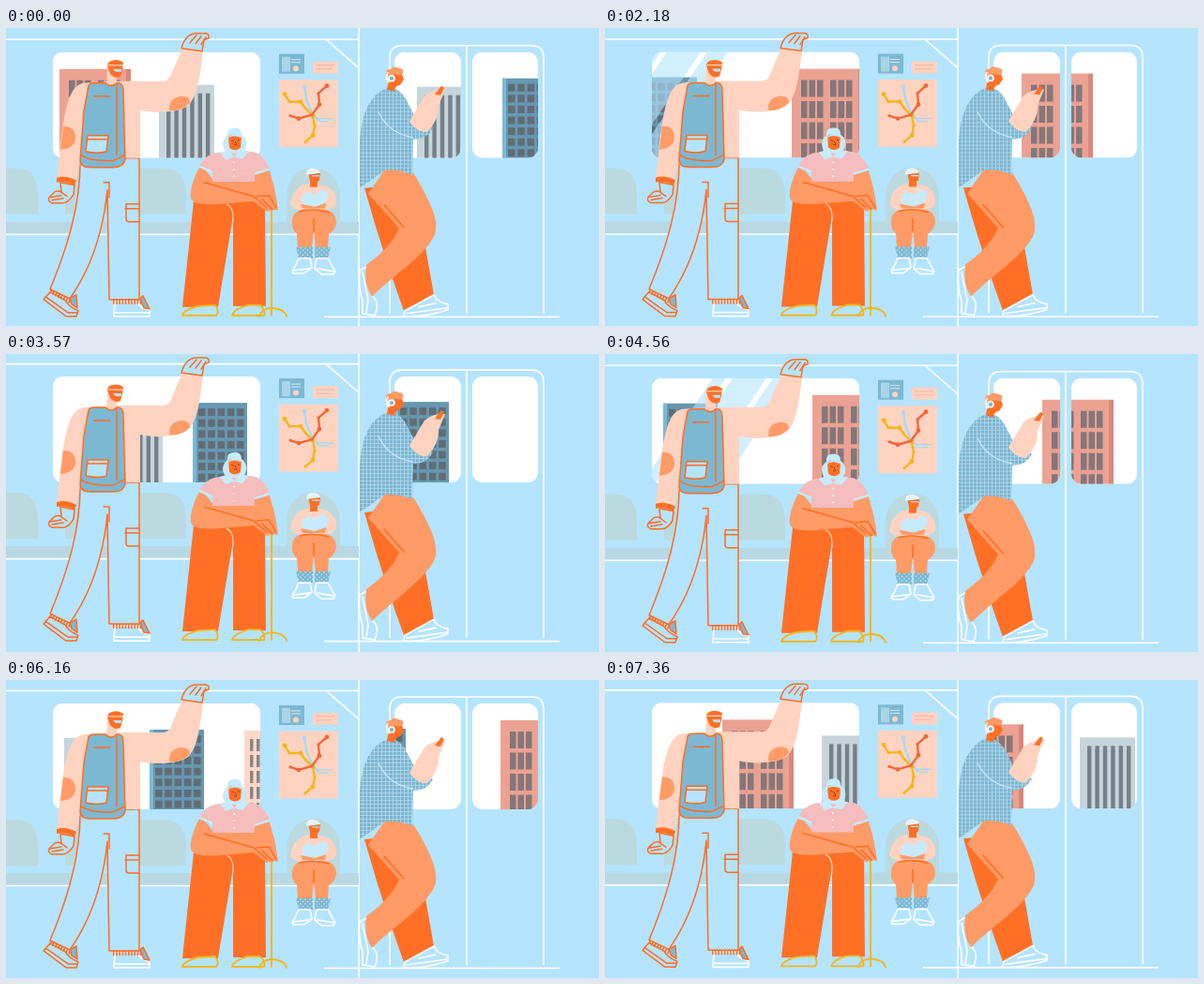
Animation, 632 px wide and 318 px high, one loop 7.46 s. Source, as an HTML page:

```html
<!DOCTYPE html>
<html lang="en">
<head>
<meta charset="utf-8">
<title>Commuters</title>
<style>
  html, body { margin: 0; width: 100%; height: 100%; overflow: hidden; background: #b5e4ff; }
  svg { display: block; width: 100vw; height: 100vh; }
  .ln { fill: none; stroke: #fff; stroke-width: 1.6; }
  .o { stroke: #ff6d22; stroke-width: 1.5; stroke-linejoin: round; stroke-linecap: round; }
  .w { stroke: #fff; stroke-width: 1.6; stroke-linejoin: round; stroke-linecap: round; }
  .y { stroke: #f5b61c; stroke-width: 1.9; stroke-linejoin: round; stroke-linecap: round; }
  .no { fill: none; }
  .peach { fill: #ffd3c0; }
  .light { fill: #ff9b66; }
  .deep { fill: #ff7026; }
  .sky { fill: #b5e4ff; }
  .blue { fill: #7db8d2; }
  .seat { fill: #bbdae0; }
  .cuff { fill: none; stroke: #ff6d22; stroke-width: 5; stroke-dasharray: 1.6 1.6; }
</style>
</head>
<body>
<svg viewBox="0 0 632 318" preserveAspectRatio="none">
  <defs>
    <clipPath id="panes">
      <rect x="50" y="25" width="221" height="113" rx="10"/>
      <rect x="414" y="25" width="71" height="113" rx="11"/>
      <rect x="497" y="25" width="70" height="113" rx="11"/>
    </clipPath>
    <clipPath id="wide"><rect x="50" y="25" width="221" height="113" rx="10"/></clipPath>
    <pattern id="check" width="4" height="4" patternUnits="userSpaceOnUse">
      <rect width="4" height="4" fill="#7db5d0"/>
      <path d="M0 .5H4M.5 0V4" stroke="#b9dff0" stroke-width=".7"/>
    </pattern>
    <pattern id="dots" width="5" height="5" patternUnits="userSpaceOnUse">
      <rect width="5" height="5" fill="#7db8d2"/>
      <circle cx="1.5" cy="1.5" r=".8" fill="#d4eefb"/><circle cx="4" cy="4" r=".8" fill="#d4eefb"/>
    </pattern>
  </defs>
  <rect width="632" height="318" class="sky"/>
  <g id="train">
    <!-- windows and passing city -->
    <g clip-path="url(#panes)">
      <rect x="40" y="20" width="540" height="125" fill="#fff"/>
      <g id="city"></g>
    </g>
    <g clip-path="url(#wide)">
      <g id="glare" fill="#b5e4ff" fill-opacity=".6">
        <path d="M0 25H14L-62 138H-76ZM21 25H57L-19 138H-55ZM64 25H86L10 138H-12Z"/>
      </g>
    </g>

    <!-- carriage -->
    <path class="ln" d="M0 11.5H376M341 11.5L376 42M376-4V322"/>
    <path class="ln" d="M409 304V31Q409 18 422 18H560Q573 18 573 31V304M491 18V304M339 307.5H590"/>
    <path class="seat" d="M0 149H12Q34 149 34 178V198H0ZM63 198V178Q63 149 85 149H169Q192 149 192 178V198ZM299 207V178A28.5 30 0 0 1 356 178V207Z"/>
    <rect y="206" width="376" height="13" fill="#b8d9e4"/>
    <path class="ln" d="M0 219.5H376"/>

    <!-- notices -->
    <rect x="291" y="27" width="27" height="21" class="blue"/>
    <path d="M294 30H303V46H294Z" fill="#a9d5e8"/>
    <path d="M304 33H314M304 36H314" stroke="#d4eefb"/>
    <circle cx="309" cy="42.5" r="3" class="peach"/>
    <rect x="327" y="35" width="27" height="13" class="peach"/>
    <path d="M330 39H350M330 43H348" stroke="#f4b8ad" stroke-width="1.2"/>
    <rect x="291" y="54.5" width="63" height="72" class="peach"/>
    <g id="map" fill="none" stroke-width="2.4" stroke-linejoin="round"></g>
    <path d="M333 96H348M334 99H344" stroke="#a9d9f2" stroke-width="1.5"/>

    <!-- standing traveller with rucksack -->
    <g>
      <path class="sky o" d="M79 138C80 186 66 232 47 278L68 288C92 254 104 212 108 172L110 289H142V138Z"/>
      <path class="no o" d="M110 180V164H104M142 187H128V203Q128 206 131 206H142M127 192H142"/>
      <path class="sky o" d="M47 281L63 290Q67 297 77 301L75 307H64L40 289ZM42 286L66 303H76"/>
      <path class="sky w" d="M116 291H140Q143 299 153 300V307H115ZM115 303H153"/>
      <path class="blue o" d="M68 288L75 284L76 298L70 294ZM143 288L146 285L153 299L147 298Z"/>
      <path class="cuff" d="M47 280L69 291M114 291.5H146"/>
      <path class="peach" d="M82 58C66 61 62 92 58 124L54 160L74 163L80 138H143V87C160 91 186 89 194 82C205 72 207 46 210 24L188 21L175 51Q173 56 166 56L124 56Z"/>
      <path class="light" d="M61 104Q74 104 74 117Q73 128 58 129Z"/>
      <path class="light" d="M174 84Q175 73 187 72Q196 72 196 79Q186 89 174 87Z"/>
      <path class="sky o" d="M187 21C189 13 194 6 202 5L213 5Q217 6 216 10L211 12L209 24Z"/>
      <path class="no o" d="M196 15L203 7M202 16L208 8M208 17L213 9"/>
      <path class="deep" d="M54 159Q64 156 75 162L73 167Q63 162 54 164Z"/>
      <path class="sky o" d="M58 164L73 167L72 177Q66 187 59 186L49 186Q44 184 46 180L50 176Q53 172 59 174Z"/>
      <path class="no o" d="M47 180L59 178M49 183L61 181M58 174L65 179"/>
      <path class="peach" d="M108 44H118V58Q112 62 107 58Z"/>
      <path class="deep" d="M109 43Q106 36 113 34Q120 32 125 36L124 44L122 51Q116 54 111 48Z"/>
      <path d="M114 43H123V46H117Z" class="sky"/>
      <path d="M109 39H125" stroke="#ffd3c0" stroke-width="1.2"/>
      <path class="blue o" d="M88 61Q89 58 94 58H106Q112 64 118 58H120Q125 59 125 66L127 140Q125 148 114 148H90Q79 148 79 140L83 88Z"/>
      <path class="no o" d="M94 72H111M80 135Q90 142 114 141L126 135M118 60V135"/>
      <path class="sky o" d="M87 114H109L107 131Q97 134 85 131ZM86 118H109"/>
    </g>

    <!-- woman with cane -->
    <g>
      <path class="deep" d="M200 184H276L277 296H242L242 200L226 297H188Z"/>
      <path d="M235 187Q243 190 242 206" fill="none" stroke="#ffd3c0" stroke-width="1.2"/>
      <path class="sky y" d="M188 306Q189 300 205 296L223 295Q228 302 224 306ZM241 306Q242 300 258 295H271Q277 301 275 306Z"/>
      <path class="no y" d="M283 190V306M270 307Q272 299 283 298Q297 299 299 307"/>
      <path class="light" d="M208 145C200 157 194 177 198 183Q204 189 228 187L264 184L278 195L285 193L290 194Q288 178 285 166L279 145L264 150V163H222Z"/>
      <path d="M222 133Q243 128 266 132Q276 136 281 150L265 155V163H220V153L206 147Q211 136 222 133Z" fill="#f5bdbd"/>
      <path d="M206 147L220 153M265 155L281 150" stroke="#c7ebfc" stroke-width="2.4"/>
      <path d="M211 164L264 179L278 191M267 179L280 178L288 191M273 182L284 193" class="no o"/>
      <path d="M233 130Q228 121 236 114Q235 106 243 106Q251 105 251 113Q260 120 254 130Q246 136 233 130Z" fill="#c7ebfc"/>
      <path class="deep" d="M237 115Q243 110 251 116L250 127Q244 132 238 127Z"/>
      <path d="M236 117Q243 108 252 117Q243 112 236 117Z" fill="#c7ebfc"/>
      <path d="M240 119L243 120M247 119L249 119M244 120L246 124H243" stroke="#a94120" fill="none"/>
      <path d="M228 132L238 129L243 137L250 129L259 131L252 139L243 137L234 140Z" fill="#c7ebfc"/>
      <path d="M243 142V162" stroke="#fff" stroke-width="1.5" stroke-dasharray="1.5 6"/>
    </g>

    <!-- seated child -->
    <g>
      <path class="peach" d="M316 167Q328 163 342 168Q353 174 352 187Q348 195 328 194Q308 196 303 188Q305 172 316 167Z"/>
      <path class="light" d="M305 206Q305 194 318 193H340Q352 195 352 208Q350 216 344 219L343 234H330L328 216L326 234H311L310 219Q304 214 305 206Z"/>
      <path class="no o" d="M313 195Q328 191 344 196M328 203V216"/>
      <path fill="url(#dots)" d="M309 233H327V245H312ZM329 233H346L343 245H329Z"/>
      <path class="sky w" d="M312 245H324L326 255L318 261H306Q304 258 308 254ZM331 245H343L349 256Q352 259 349 262H336L329 256ZM307 258L323 256M332 256L349 259"/>
      <path class="deep" d="M322 153H335L334 162Q329 167 324 163ZM324 160H332V169H324Z"/>
      <path d="M320 156Q320 148 328 149Q335 151 335 154Z" fill="#e6f4fa"/>
      <path d="M326 157H334" stroke="#b5e4ff" stroke-width="1.2"/>
      <path d="M316 178L322 174L329 177L338 171L344 177L340 187L329 190L315 187Z" fill="#c7ebfc"/>
      <path class="light" d="M314 187L329 190L341 186L340 192H316Z"/>
    </g>

    <!-- passenger reading a phone -->
    <g>
      <path class="deep" d="M382 170L435 165L456 284Q441 295 424 301Q401 238 382 170Z"/>
      <path class="sky w" d="M425 301L456 284L459 289Q464 293 471 294V300Q446 308 424 307ZM440 297L458 293M427 304L470 298"/>
      <path class="sky w" d="M384 254L377 258Q375 276 380 290V304L393 306Q399 292 390 285ZM380 260L386 290L384 303"/>
      <path class="light" d="M404 150H431Q441 163 452 187Q461 207 457 220C446 243 414 262 390 286Q381 273 384 252C397 243 413 228 419 213L386 176Z"/>
      <path class="no o" d="M403 188L424 212"/>
      <path fill="url(#check)" d="M404 64Q416 60 425 73L436 94L455 106Q448 119 434 118L433 156Q420 150 404 151L377 170V119Q380 75 404 64Z"/>
      <path class="peach" d="M430 99L446 72Q455 64 468 65L461 82Q462 96 449 110Q440 112 430 99Z"/>
      <path d="M397 89Q408 112 434 116" fill="none" stroke="#c7ebfc" stroke-width="1.2"/>
      <path d="M457 70L464 61L467 63L463 71Z" class="deep"/>
      <path class="deep" d="M409 46H421L424 54L420 60Q414 61 414 67L406 65Z"/>
      <path class="light" d="M406 50Q403 43 410 43Q414 39 418 42Q425 42 423 48Q418 51 414 48L411 54Z"/>
      <path d="M407 47Q404 52 408 57" class="no w"/>
      <circle cx="411" cy="53" r="3" class="blue w"/>
    </g>
  </g>
</svg>
<script>
const LOOP = 7460, STEPS = 75, SPAN = 846, FLOOR = 142;
const byId = id => document.getElementById(id);
const rect = (x, y, w, h, fill) => `<rect x="${x}" y="${y}" width="${w}" height="${h}" fill="${fill}"/>`;
const range = (count, draw) => Array.from({ length: count }, (_, i) => draw(i)).join('');
const grid = (xs, y, w, h, pitch, fill) =>
  xs.map(x => range(Math.ceil((FLOOR - y) / pitch), i => rect(x, y + i * pitch, w, h, fill))).join('');

function brick(x, y) {
  const cols = [10, 18.5, 27, 41, 49.5, 58].map(dx => x + dx);
  return rect(x, y, 71, FLOOR - y, '#eba292') + rect(x + 71, y, 5, FLOOR - y, '#da877d') +
    grid(cols, y + 12, 6.5, 18, 22.5, '#85777a');
}
function striped(x, y) {
  return rect(x, y, 59, FLOOR - y, '#c6d5da') +
    range(6, i => rect(x + 8 + i * 8.4, y + 9, 4.4, FLOOR - y, '#74808a'));
}
function tower(x, y) {
  const cols = [6, 16.3, 26.6, 36.9, 47.2].map(dx => x + dx);
  return rect(x, y, 58, FLOOR - y, '#6798b0') + rect(x, y, 4, FLOOR - y, '#7db8d2') +
    grid(cols, y + 6, 7.5, 8, 11.6, '#606d76');
}
function pale(x, y) {
  return rect(x, y, 60, FLOOR - y, '#ffd8c9') +
    grid([6, 13, 26, 33, 46, 53].map(dx => x + dx), y + 9, 3.5, 13, 17, '#8c8785');
}

const block = brick(0, 43) + striped(106, 60) + brick(245, 48) + striped(381, 62) +
  tower(472, 53) + pale(573, 54) + tower(687, 52);
byId('city').innerHTML = range(3, i => `<g transform="translate(${(i - 1) * SPAN})">${block}</g>`);

const routes = [
  ['#a9d9f2', [[318, 62], [320, 75], [327, 92], [333, 97]]],
  ['#f5b61c', [[297, 70], [302, 78], [314, 78], [319, 85], [327, 93], [329, 104], [327, 114], [319, 121]]],
  ['#f0683a', [[342, 61], [333, 69], [334, 81], [326, 92], [312, 96], [303, 93]]]
];
byId('map').innerHTML = routes.map(([color, stops]) =>
  `<polyline stroke="${color}" points="${stops.join(' ')}"/>` +
  stops.map(([x, y], i) => `<circle cx="${x}" cy="${y}" r="${i % 2 ? 1.6 : 2.4}" fill="${color}"/>`).join('')
).join('');

// [step, city offset]
const travel = [[1, 57], [11, -291], [22, -647], [36, -1119], [46, -1471], [62, -2011], [74, -2413]];

function offsetAt(step) {
  const i = Math.max(1, travel.findIndex(([s]) => s >= step));
  const [s0, x0] = travel[i - 1], [s1, x1] = travel[i];
  return x0 + (x1 - x0) * (step - s0) / (s1 - s0);
}
const wrap = (value, size) => ((value % size) + size) % size;
const move = (id, x, y) => byId(id).setAttribute('transform', `translate(${x.toFixed(2)} ${y.toFixed(2)})`);

function draw(now) {
  const time = now % LOOP;
  const step = Math.min(STEPS - 1, Math.max(1, Math.floor((time + 18) / (LOOP / STEPS))));
  const cycle = STEPS / 3;
  move('city', wrap(offsetAt(step), SPAN), 0);
  move('glare', 115 - 70 * (wrap(step, cycle) - 21), 0);
  move('train', 0, 0.9 * Math.cos(2 * Math.PI * (step - 0.57) / (cycle / 6)));
}

const start = performance.now();
function tick() {
  draw(performance.now() - start);
  requestAnimationFrame(tick);
}
tick();
</script>
</body>
</html>
```
